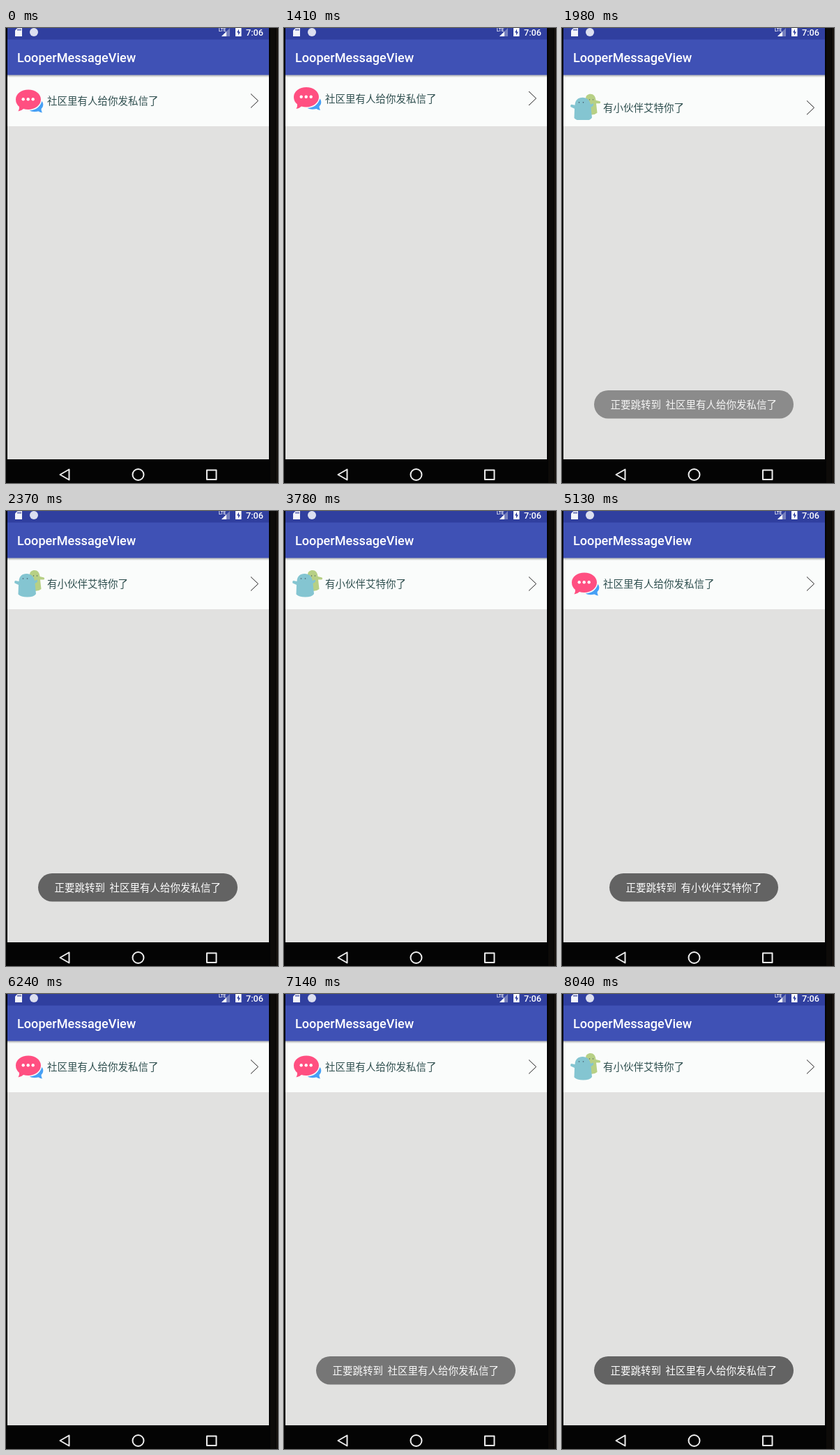
An HTML page for the animation above (8.31 s loop, 390 px wide and 653 px high).

```html
<!DOCTYPE html>
<html lang="zh-CN">
<head>
<meta charset="utf-8">
<title>LooperMessageView</title>
<style>
  html, body { margin: 0; width: 100%; height: 100%; overflow: hidden; background: #000; }
  svg { display: block; }
  text { font-family: "Noto Sans CJK SC", "Noto Sans CJK", sans-serif; font-size: 14.5px; white-space: pre; }
  .latin { font-family: Roboto, sans-serif; font-weight: 500; fill: #fff; }
  .row text { fill: #2f4f4f; }
  .toast text { fill: #fff; }
  .toast rect { fill: #636363; }
  .nav { fill: none; stroke: #eee; stroke-width: 2; stroke-linejoin: round; }
</style>
</head>
<body>
<svg width="390" height="653" viewBox="0 0 390 653">
  <defs>
    <linearGradient id="shadow" x2="0" y2="1">
      <stop stop-color="#000" stop-opacity=".3"/>
      <stop offset="1" stop-color="#000" stop-opacity="0"/>
    </linearGradient>
    <clipPath id="window"><rect x="2" y="77" width="375" height="55"/></clipPath>
    <path id="chevron" d="M351 94.5 361.5 104.5 351 114.5" fill="none" stroke="#222" stroke-width="1"/>
  </defs>

  <!-- device and screen -->
  <rect width="390" height="653" fill="#040404"/>
  <rect x="379" width="7" height="653" fill="#0d0b09"/>
  <rect x="387" width="3" height="653" fill="#15110d"/>
  <rect x="2" width="375" height="619" fill="#e1e1e0"/>
  <rect x="2" y="67" width="375" height="74" fill="#fafcfb"/>
  <rect x="2" width="375" height="17" fill="#303f9f"/>
  <rect x="2" y="16.5" width="375" height="51" fill="#3f51b5"/>
  <rect x="2" y="67.5" width="375" height="3.5" fill="url(#shadow)"/>
  <text class="latin" x="16" y="49" style="font-size:18.1px">LooperMessageView</text>

  <!-- status bar -->
  <path d="M16.5 0H23V12H13V3.5Z" fill="#f4f5fa"/>
  <path d="M17 1V4M19 1V4M21 1V4" stroke="#303f9f"/>
  <circle cx="40" cy="6" r="6" fill="#dcdff0"/>
  <path d="M321 0V12H309Z" fill="#7680be"/>
  <path d="M316 5V12H309Z" fill="#fff"/>
  <text class="latin" x="305" y="5" style="font-size:6.5px">LTE</text>
  <path d="M329 0H337.5V12H329Z" fill="#fff"/>
  <path d="M334 1.5 331 6.5H333V10.5L336 5.5H334Z" fill="#303f9f"/>
  <text class="latin" x="344" y="10.5" style="font-size:12.7px">7:06</text>

  <!-- looping messages -->
  <g clip-path="url(#window)">
    <g class="row">
      <path d="M51.5 105C54.5 109 53.5 113.5 50.5 116Q50.5 119 52 121.5Q48.5 121 46.5 119.5Q39 121.5 33.5 118.5Q47.5 117.5 51.5 105Z" fill="#46a0f5"/>
      <path d="M32 88.5C42 88.5 50 94.5 50 102.5S42 117 32 117Q28 117 25 116Q22 119 17.5 119.5Q19.5 116.5 19 113Q14 109 14 102.5C14 94.5 22 88.5 32 88.5Z" fill="#ff4f81"/>
      <g fill="#fff"><circle cx="24.7" cy="102.3" r="2.2"/><circle cx="31.7" cy="102.3" r="2.2"/><circle cx="38.7" cy="102.3" r="2.2"/></g>
      <text x="59" y="110">社区里有人给你发私信了</text>
      <use href="#chevron"/>
    </g>
    <g class="row">
      <path d="M34 92C34 87 37 85 41 85S48 88 48.5 94L54.5 95.5Q56 97.5 54 98.5L49 98.5 50.5 112Q46 116 38 114Z" fill="#b7d085"/>
      <path d="M18.5 101C19 93.5 23 90 29.5 90S39.5 93.5 41 100L44.5 98.5Q46 100.5 44 102.5L41.5 104 43 119Q40 123.5 30.5 123.5T17.5 119.5L18 106 12.5 103.5Q11.500 101 13.500 100Z" fill="#84c5d1"/>
      <g fill="#456"><circle cx="24.500" cy="97" r=".8"/><circle cx="30.500" cy="97" r=".8"/><circle cx="39.500" cy="93" r=".7"/><circle cx="44.500" cy="93" r=".7"/></g>
      <text x="59" y="110">有小伙伴艾特你了</text>
      <use href="#chevron"/>
    </g>
  </g>

  <g class="toast">
    <rect x="46" y="520" width="286" height="40.500" rx="20.200"/>
    <text x="69.500" y="546">正要跳转到  社区里有人给你发私信了</text>
  </g>
  <g class="toast">
    <rect x="68" y="520" width="242" height="40.500" rx="20.200"/>
    <text x="91.500" y="546">正要跳转到  有小伙伴艾特你了</text>
  </g>

  <!-- navigation bar -->
  <g class="nav">
    <path d="M77.500 641 90.500 633.500V648.500Z"/>
    <circle cx="189.500" cy="641" r="8"/>
    <rect x="288" y="634.500" width="13.500" height="13.500"/>
  </g>
</svg>
<script>
const LOOP = 8310, STEP = 60, HEIGHT = 55;
const rows = document.querySelectorAll('.row');
const toasts = document.querySelectorAll('.toast');

// The screen freezes for a moment whenever a toast is being opened.
const stalls = [[1710, 1890], [4530, 4680], [7140, 7260]];
const slides = [[1410, 2370], [4410, 5130], [7260, 8040]];
const shows = [
  { toast: 0, enter: 1850, exit: 3430, gone: 3780 },
  { toast: 1, enter: 4640, exit: 6010, gone: 6240 },
  { toast: 0, enter: 6955, exit: LOOP, gone: LOOP + 300 },
];

const clamp = x => Math.min(1, Math.max(0, x));
const decelerate = x => 1 - (1 - clamp(x)) ** 2;
const accelerate = x => clamp(x) ** 2;

function slideProgress(t, [first, end]) {
  if (t < first) return 0;
  const start = first - 32;
  const stepped = first + Math.floor((t - first) / STEP) * STEP;
  return decelerate((stepped - start) / (end - start));
}

function toastOpacity(t, { enter, exit, gone }) {
  return decelerate((t - enter) / 305) * (1 - accelerate((t - exit) / (gone - exit)));
}

function moveRow(index, y) {
  rows[index % 2].setAttribute('transform', `translate(0 ${y})`);
}

function render(time) {
  let t = time % LOOP;
  for (const [from, to] of stalls) if (t > from && t < to) t = from;

  const position = slides.reduce((sum, slide) => sum + slideProgress(t, slide), 0);
  const current = Math.floor(position), shift = position - current;
  moveRow(current, -HEIGHT * shift);
  moveRow(current + 1, HEIGHT * (1 - shift));

  const opacity = [0, 0];
  for (const show of shows) opacity[show.toast] += toastOpacity(t, show);
  toasts.forEach((toast, i) => toast.setAttribute('opacity', opacity[i]));
}

const origin = performance.now();
function tick() {
  render(performance.now() - origin);
  requestAnimationFrame(tick);
}
tick();
</script>
</body>
</html>
```
